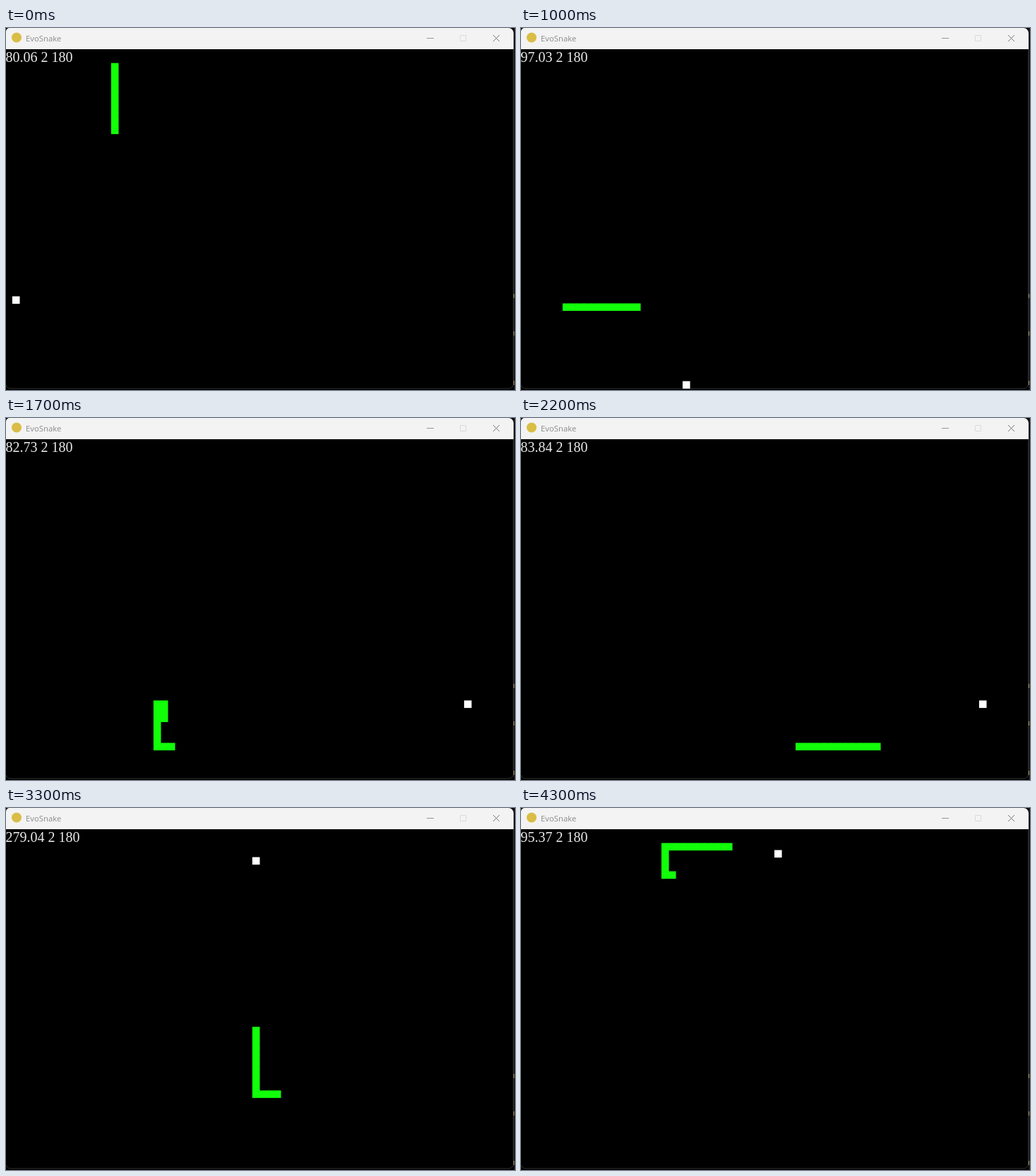
Write an HTML page with a canvas that moves like this. It is 721 px wide and 512 px high and loops after 4400 ms.

```html
<!DOCTYPE html>
<html lang="en">
<head>
<meta charset="utf-8">
<title>EvoSnake</title>
<style>
  html, body { margin: 0; width: 100%; height: 100%; overflow: hidden; background: #000; }
  canvas { display: block; }
</style>
</head>
<body>
<canvas id="stage" width="721" height="512"></canvas>
<script>
const ctx = document.getElementById('stage').getContext('2d');
const TICK = 100, TICKS = 44, STEPS_PER_TICK = 5.42;
const CELL = 10, CELL_SIZE = 10.6, LEFT = -1.1, TOP = 29.5;
const START_LENGTH = 10;

// Cells the snake steers for; those marked as food are eaten on arrival.
const food = (x, y) => ({ x, y, isFood: true });
const turn = (x, y) => ({ x, y });
const goals = [
  food(1, 35), food(23, 47), turn(22, 37), turn(21, 43), turn(65, 43), food(65, 37),
  turn(35, 37), food(35, 4), food(20, 6), turn(20, 2), turn(35, 2), food(36, 3),
];
const foods = goals.filter(g => g.isFood);

// Score readings by tick; the nearest one is shown.
const readings = { 0: 80.06, 10: 97.03, 17: 82.73, 22: 83.84, 28: 227.95, 33: 279.04, 43: 95.37 };

// Keep heading while the goal lies ahead, otherwise turn towards it.
// If the goal is behind, the side step is followed by a U-turn.
function planRoute(x, y) {
  const route = [{ x, y }];
  let dx = 0, dy = 1;
  for (const goal of goals) {
    while (x !== goal.x || y !== goal.y) {
      const toX = Math.sign(goal.x - x), toY = Math.sign(goal.y - y);
      const ahead = toX * dx + toY * dy;
      const behind = dx ? toY === 0 : toX === 0;
      if (ahead <= 0 && !behind) [dx, dy] = dx ? [0, toY] : [toX, 0];
      // A side step ends as soon as the other axis points back at the goal.
      x += dx;
      y += dy;
      route.push({ x, y });
      const last = route[route.length - 3];
      const justTurned = last && last.x !== x && last.y !== y;
      if (justTurned && ahead < 0) [dx, dy] = dx ? [0, toY] : [toX, 0];
    }
  }
  return route;
}

const route = planRoute(15, 2);
const mealSteps = foods.map(f => route.findIndex(c => c.x === f.x && c.y === f.y));

function box(x, y, w, h, color) {
  ctx.fillStyle = color;
  ctx.fillRect(x, y, w, h);
}

function cell({ x, y }, color) {
  box(LEFT + x * CELL, TOP + y * CELL, CELL_SIZE, CELL_SIZE, color);
}

function text(str, x, y, font, color) {
  ctx.font = font;
  ctx.fillStyle = color;
  ctx.fillText(str, x, y);
}

function stroke(color, path) {
  ctx.strokeStyle = color;
  ctx.lineWidth = 1;
  ctx.stroke(new Path2D(path));
}

function drawWindow() {
  box(0, 0, 721, 512, '#000');

  // Slivers of the desktop and the window frame
  box(719, 0, 2, 512, '#191919');
  for (const y of [376, 429, 499]) box(719, y, 1, 6, '#a08a50');
  stroke('#333', 'M718.5 29V503Q718.5 510 711 510H7Q1 510 0 505');

  // Title bar
  ctx.fillStyle = '#f3f3f3';
  ctx.beginPath();
  ctx.roundRect(0, 0, 719, 30, [5, 7, 0, 0]);
  ctx.fill();
  ctx.fillStyle = '#d9bd45';
  ctx.beginPath();
  ctx.arc(15, 13.5, 7, 0, 2 * Math.PI);
  ctx.fill();
  text('EvoSnake', 28, 18.5, '11.3px "Open Sans", sans-serif', '#8b8b8b');
  stroke('#969696', 'M596 14.5H606');
  stroke('#dadada', 'M643.5 10.5H651.5V18.5H643.5Z');
  stroke('#777', 'M690 10L699 19M699 10L690 19');
}

function readingAt(tick) {
  const distance = t => Math.abs(t - tick);
  const nearest = Object.keys(readings).reduce((a, b) => distance(b) < distance(a) ? b : a);
  return readings[nearest].toFixed(2);
}

function draw(tick) {
  const head = START_LENGTH - 1 + Math.round(tick * STEPS_PER_TICK);
  const eaten = mealSteps.filter(step => step <= head).length;

  drawWindow();
  cell(foods[eaten], '#fff');
  route.slice(head + 1 - START_LENGTH - eaten, head + 1).forEach(c => cell(c, '#12ff0a'));
  text(`${readingAt(tick)} 2 180`, -0.5, 48, '20px "Liberation Serif", serif', '#e8e8e8');
}

const start = performance.now();
function frame() {
  draw(Math.floor((performance.now() - start) / TICK) % TICKS);
  requestAnimationFrame(frame);
}
frame();
</script>
</body>
</html>
```
